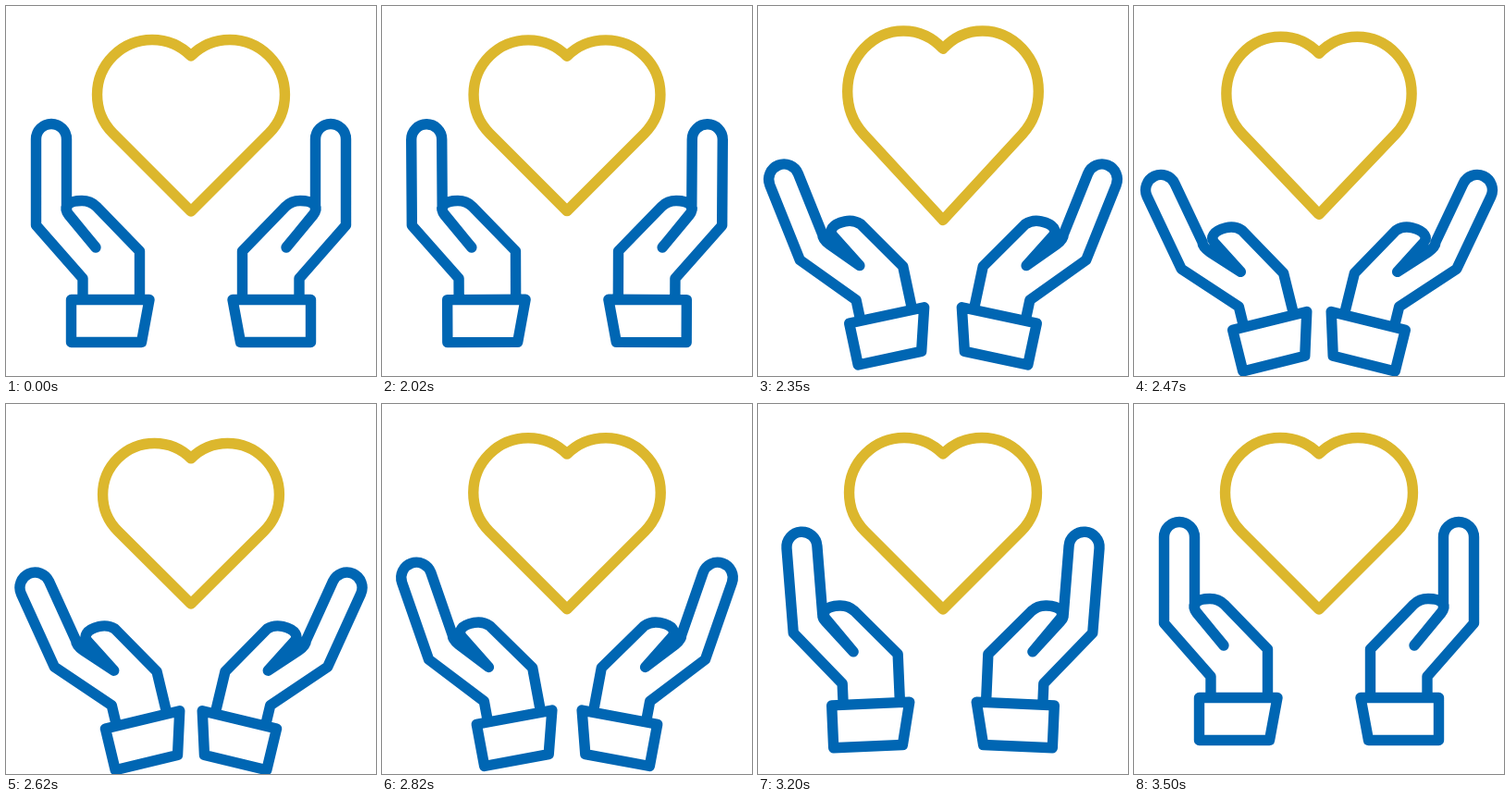
An HTML page for the animation above (3520 ms loop, 400 px wide and 400 px high).

```html
<!DOCTYPE html>
<html lang="en">
<head>
<meta charset="utf-8">
<title>Caring hands</title>
<style>
  html, body { margin: 0; width: 100%; height: 100%; overflow: hidden; background: #fff; }
  svg { display: block; width: 400px; height: 400px; }
  path { fill: none; stroke-width: 11.4; stroke-linecap: round; stroke-linejoin: round; vector-effect: non-scaling-stroke; }
  #heart { stroke: #dcb72d; }
  #hand { stroke: #0066b3; }
</style>
</head>
<body>
<svg viewBox="0 0 400 400">
  <path id="heart" d="M200 222 L115.8 137.7 A59 59 0 0 1 200 54 A59 59 0 0 1 284.2 137.7 Z"/>
  <path id="hand"/>
  <use href="#hand" transform="translate(400) scale(-1 1)"/>
</svg>
<script>
const LOOP = 3520;
const heart = document.getElementById('heart');
const hand = document.getElementById('hand');

const clamp = p => Math.min(1, Math.max(0, p));
const ease = p => (1 - Math.cos(Math.PI * p)) / 2;
const ramp = (t, from, to, power = 1) => ease(clamp((t - from) / (to - from)) ** power);

// Hand outline before tilting: b = 0 upright, b = 1 fully open
function outline(b) {
  const baseY = 237 + 3 * b;
  const angle = -0.2 * b, cos = Math.cos(angle), sin = Math.sin(angle);
  // Finger points swing around the base of the finger and shorten a little
  const swing = (dx, dy) => {
    const y = dy * (1 - 0.07 * b);
    return `${32.5 + dx * cos - y * sin} ${baseY + dx * sin + y * cos}`;
  };
  const crease = `M${97 - 3 * b} ${261 - 2.5 * b}`;
  const curl = 6 * b * b;

  const finger = `${crease} L${68 - b} ${226 + 4 * b} Q${65.5 - 5 * b} 223 ${swing(33, -18)}
    L${swing(33, -93)} A16.5 16.5 0 0 0 ${swing(0, -93)}
    L32.5 ${baseY} L83 294.5 V316`;
  const thumb = `${crease} L${66 + 8 * b} ${223 - 2 * b}
    c-3 -6 1 -12.5 16 -12.5 c7 0 12 2.5 16 6.5
    L${144.5 - curl} ${265 + curl} V316`;
  const cuff = `M70.5 317.5 H${155 - 2 * b} L${146.5 - 7 * b} 363.5 H70.5 Z`;
  return finger + thumb + cuff;
}

function draw(t) {
  const bend = t < 2500 ? ramp(t, 2000, 2500, 0.8) : 1 - ramp(t, 2500, 3470);
  const slide = ramp(t, 2000, 2520) - ramp(t, 2600, 3500);
  hand.setAttribute('d', outline(bend));
  hand.setAttribute('transform',
    `translate(${37 * slide} ${33.5 * slide}) rotate(${-14 * bend} 70.5 317.5)`);

  // Heartbeat: squeeze, overshoot, small dip, rest
  const squeeze = ramp(t, 2000, 2210), swell = ramp(t, 2210, 2360);
  const dip = ramp(t, 2360, 2610), settle = ramp(t, 2610, 2850);
  const sx = 1 - 0.206 * squeeze + 0.226 * swell - 0.08 * dip + 0.06 * settle;
  const sy = 1 - 0.155 * squeeze + 0.26 * swell - 0.17 * dip + 0.065 * settle;
  heart.setAttribute('transform',
    `translate(200 129.5) scale(${sx} ${sy}) translate(-200 -129.5)`);
}

const start = performance.now();
function tick() {
  draw((performance.now() - start) % LOOP);
  requestAnimationFrame(tick);
}
tick();
</script>
</body>
</html>
```
